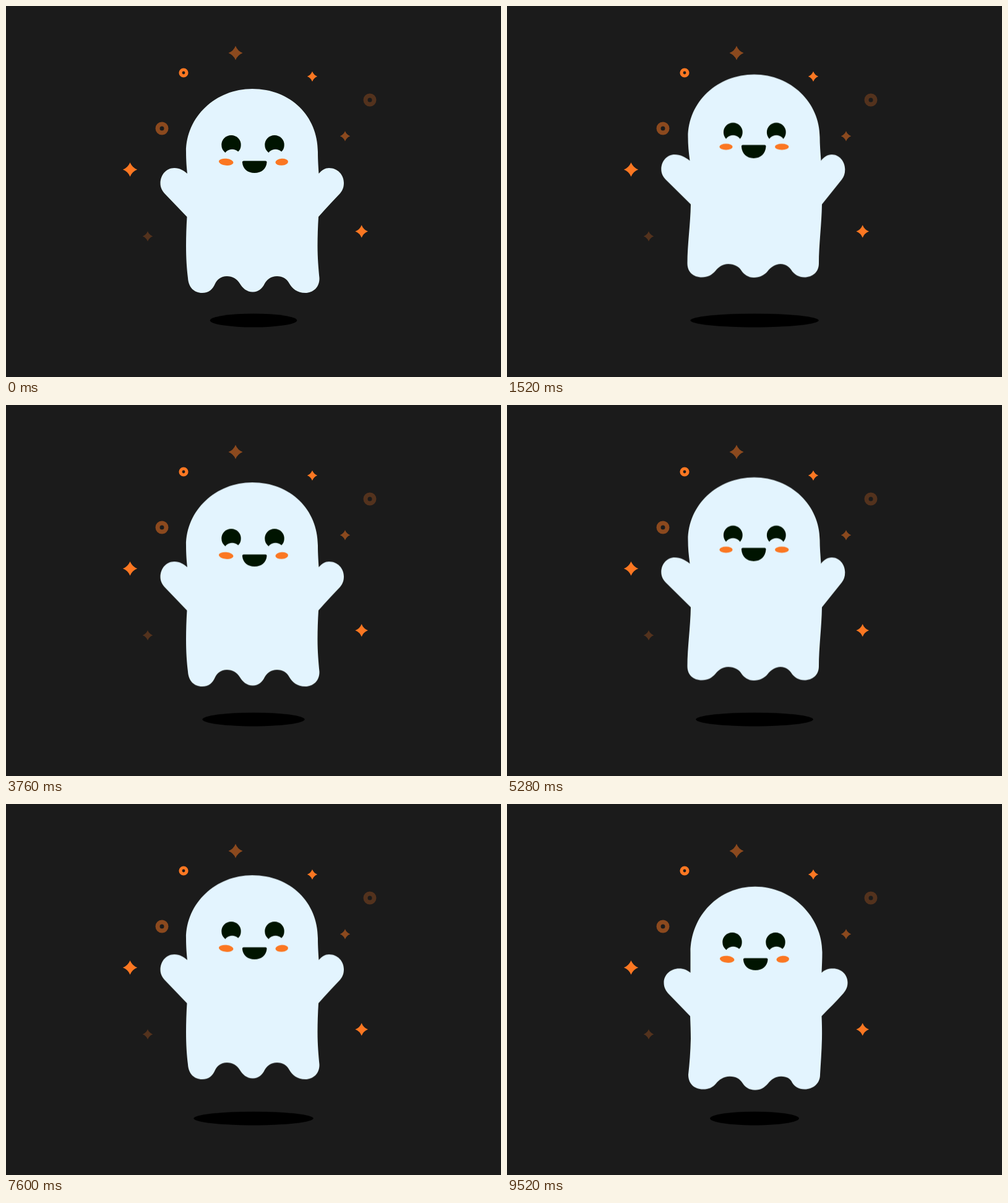
Animation, 800 px wide and 600 px high, one loop 9.6 s. Source, as an HTML page without scripts:

```html
<!DOCTYPE html>
<html lang="en">
<head>
<meta charset="utf-8">
<title>Floating ghost</title>
<style>
  html, body { margin: 0; width: 100%; height: 100%; overflow: hidden; background: #1b1b1b; }
  svg { display: block; width: 800px; height: 600px; }

  .spark { fill: #fb7722; }
  .ring { fill: none; stroke: #fb7722; }
  .half { opacity: .5; }
  .faint { opacity: .25; }
  .skin { fill: #e3f4fe; }
  .ink { fill: #001400; }
  .blush { fill: #fb7722; }

  .ghost { animation: float 1.6s linear infinite alternate; }
  .shadow { transform-origin: 400px 508.5px; animation: spread 1.6s linear infinite alternate; }
  @keyframes float { to { transform: translateY(-25px); } }
  @keyframes spread { to { transform: scaleX(1.5); } }

  /* The outline jumps through five wobble poses, 28 rounds per loop. */
  .pose { opacity: 0; animation: calc(9.6s / 28) step-end infinite; }
  .a { animation-name: pose-a; }
  .b { animation-name: pose-b; }
  .c { animation-name: pose-c; }
  .d { animation-name: pose-d; }
  .e { animation-name: pose-e; }
  @keyframes pose-a { 0%, 88.3% { opacity: 1; } 25% { opacity: 0; } 100% { opacity: 1; } }
  @keyframes pose-b { 0%, 46.7%, 100% { opacity: 0; } 25% { opacity: 1; } }
  @keyframes pose-d { 0%, 55%, 100% { opacity: 0; } 46.7% { opacity: 1; } }
  @keyframes pose-c { 0%, 68.3%, 100% { opacity: 0; } 55% { opacity: 1; } }
  @keyframes pose-e { 0%, 88.3%, 100% { opacity: 0; } 68.3% { opacity: 1; } }
</style>
</head>
<body>
<svg viewBox="0 0 800 600" xmlns="http://www.w3.org/2000/svg">
  <defs>
    <path id="star" d="M0-1Q.28-.28 1 0Q.28.28 0 1Q-.28.28-1 0Q-.28-.28 0-1Z"/>
    <path id="mouth" class="ink" d="M-17.500 0H17.500Q20 0 19.800 2.500C19 13 11 19.500 0 19.500S-19 13-19.800 2.500Q-20 0-17.500 0Z"/>
    <g id="eye">
      <ellipse class="ink" rx="15.700" ry="15.800"/>
      <ellipse class="skin" cx="1.500" cy="19.300" rx="13.200" ry="12.300"/>
    </g>
    <g id="high-eye">
      <ellipse class="ink" rx="15.400" ry="15.400"/>
      <ellipse class="skin" cy="16.800" rx="13" ry="12"/>
    </g>

    <g id="face-left">
      <use href="#eye" x="364" y="224.700"/>
      <use href="#eye" x="434" y="224.700"/>
      <use href="#mouth" x="401.700" y="250.600"/>
      <ellipse class="blush" rx="11.800" ry="5.500" transform="translate(355.700 252.300) rotate(5)"/>
      <ellipse class="blush" rx="10.300" ry="5.500" transform="translate(445.700 252.300) rotate(-4)"/>
    </g>
    <g id="face-high">
      <use href="#high-eye" x="365.300" y="228"/>
      <use href="#high-eye" x="435.300" y="228"/>
      <use href="#mouth" transform="translate(398.700 248.500) scale(1 1.100)"/>
      <ellipse class="blush" cx="354" cy="251.500" rx="10.600" ry="5"/>
      <ellipse class="blush" cx="444.200" cy="251.500" rx="11.200" ry="5"/>
    </g>
    <g id="face-right">
      <use href="#eye" x="366" y="227"/>
      <use href="#eye" x="436" y="227"/>
      <use href="#mouth" transform="translate(400.500 250.400) scale(1 .960)"/>
      <ellipse class="blush" cx="356" cy="253.500" rx="10.800" ry="5.200"/>
      <ellipse class="blush" cx="446.300" cy="253.500" rx="11" ry="5.200"/>
    </g>
  </defs>

  <rect width="800" height="600" fill="#1b1b1b"/>

  <g class="spark">
    <use href="#star" class="half" transform="translate(371 76) scale(11.500)"/>
    <use href="#star" transform="translate(495 114) scale(8.200)"/>
    <use href="#star" class="half" transform="translate(548 210.500) scale(8.200)"/>
    <use href="#star" transform="translate(574.700 364.500) scale(10.300)"/>
    <use href="#star" transform="translate(200.500 264.500) scale(11.600)"/>
    <use href="#star" class="faint" transform="translate(229 372.500) scale(8.200)"/>
  </g>
  <g class="ring">
    <circle cx="287" cy="108" r="5" stroke-width="5.200"/>
    <circle class="half" cx="252" cy="198" r="7" stroke-width="7"/>
    <circle class="faint" cx="588" cy="152" r="7" stroke-width="7"/>
  </g>

  <ellipse class="shadow" cx="400" cy="508.500" rx="70.200" ry="11"/>

  <g class="ghost">
    <g class="pose a">
      <path class="skin" d="M293 271C292 262 291 250 291 236C291 179 339 134 398 134C460 134 504 178 504 236C504 250 505 262 505.500 271
        C511 265 516 262 522 262C536 262 546 273 546 286C546 293 544 298 540 303C528 316 516 328 505 341
        C504 357 503.500 372 503.500 388C503.500 408 505 424 506.500 440
        C507 455 496 464 484 464C470 464 463 457 458 449C454 441 447 437 438 437C428 437 422 442 418 449
        C414 457 408 462.500 399 462.500C389 462.500 382 456 378 449C373 441 366 437 357 437C347 437 341 443 338 449
        C334 458 328 464 317 464C304 464 295 455 294 440C292 424 291 408 291 388C291 372 291.500 357 292.500 341
        L258 305C252 299 249.500 293 249.500 287C249.500 273 259 262 272 262C281 262 287 266 293 271Z"/>
      <use href="#face-left"/>
    </g>

    <g class="pose b">
      <path class="skin" d="M295.500 274C293.500 260 292.500 248 292.500 236C292.500 179 340 134.600 399.500 134.600C459 134.600 505.500 180 505.500 236C505.500 248 506.500 260 507.500 274
        C512 268 518 264 525 264C537 264 546.300 275 546.300 288C546.300 295 544.500 300 541 304.500L509 344.500
        C508.500 376 504 410 504 440C504 454 494 462.500 480.500 462.500C472 462.500 465 458 461 453
        C457 446 451 441 442 441C434 441 426 446 421 453C416 459 408 463 399 463C390 463 383 458 379 452
        C375 445 367 441 357.500 441C348 441 342 446 337 452C331 459 324 462.500 315 462.500
        C301 462.500 291.500 454 291.500 440C291.500 410 296.500 376 297 344.500
        L257 305C252 300 249.300 294 249.300 288C249.300 274 259 264 271 264C280 264 288 268 295.500 274Z"/>
      <use href="#face-high"/>
    </g>

    <g class="pose c">
      <path class="skin" d="M297.500 275C297.500 260 296 248 296 235C296 177 340 133 399 133C460 133 509 184 509 243C509 254 509.500 264 509.500 275
        C514 270 520 266 527 266C538 266 547.500 275 547.500 288C547.500 295 546 300 542 305.500C532 319 520 331 509.500 345
        C509 376 504 408 504 438C504 453 494 462.500 481 462.500C472 462.500 465 458 461 452
        C457 445 451 440 441 440C432 440 425 446 420 452C415 459 408 462.700 399 462.700C390 462.700 383 458 379 452
        C375 445 367 440 358 440C348 440 341 446 336 452C330 459 324 462.500 315 462.500
        C301 462.500 292 453 292 438C292 408 297 376 297 345
        L258 306C253 301 250.500 295 250.500 288C250.500 275 260 266 273 266C283 266 290 270 297.500 275Z"/>
      <use href="#face-high"/>
    </g>

    <g class="pose d">
      <path class="skin" d="M294 272.700C295 262 295.500 252 295.500 241C297 179 342 135.500 400 135.500C460 135.500 508.500 184 508.500 240C508.500 252 507 262 506.500 272.700
        C512 269 518 267.700 526 267.700C540 267.700 551 278 551 292C551 299 549 304 545 309C533 322 519 331 505 340.700
        C505.500 370 510 405 508.500 441C509 457 497 465.700 483 465.700C474 465.700 469 462 465 456
        C460 447 453 442.700 442 442.700C433 442.700 428 447 424 455C418 463 412 466.700 403 466.700C393 466.700 387 462 382 455
        C378 447 370 442.700 361 442.700C352 442.700 346 448 342 455C336 463 329 465.700 320 465.700
        C306 465.700 295 457 295.500 441C297 405 293.500 370 293 340.700
        L261 309C256 304 254 298 254 291C254 277 266 267.500 280 267.500C286 267.500 290 269 294 272.700Z"/>
      <use href="#face-right"/>
    </g>

    <g class="pose e">
      <path class="skin" d="M296.500 274C296.500 262 296.500 252 296.500 241C297 181 343 134.700 401 134.700C461 134.700 509.500 184 509.500 241C509.500 252 509 262 508.500 274
        C514 269 519 267.300 527 267.300C540 267.300 550.500 277 550.500 290C550.500 297 548 302 544 307C533 320 520 332 508.500 344.300
        C509 357 509.300 369 509 381C508.500 402 507 421 506 439C506 453 495 462.500 481 462.500C471 462.500 465 458 461 452
        C458 445 452 441.700 443 441.700C433 441.700 427 447 422 453C416 460 410 463.700 401 463.700C391 463.700 385 459 381 453
        C376 445 370 441.700 360 441.700C350 441.700 343 447 338 453C332 460 326 462.500 317 462.500
        C302 462.500 293 453 293 439C295 421 296.500 402 297 381C297 369 296.500 357 296 344.300
        L260 307C256 302 253.500 297 253.500 290C253.500 277 265 267.300 278 267.300C286 267.300 291 270 296.500 274Z"/>
      <use href="#face-left"/>
    </g>
  </g>
</svg>
</body>
</html>
```
